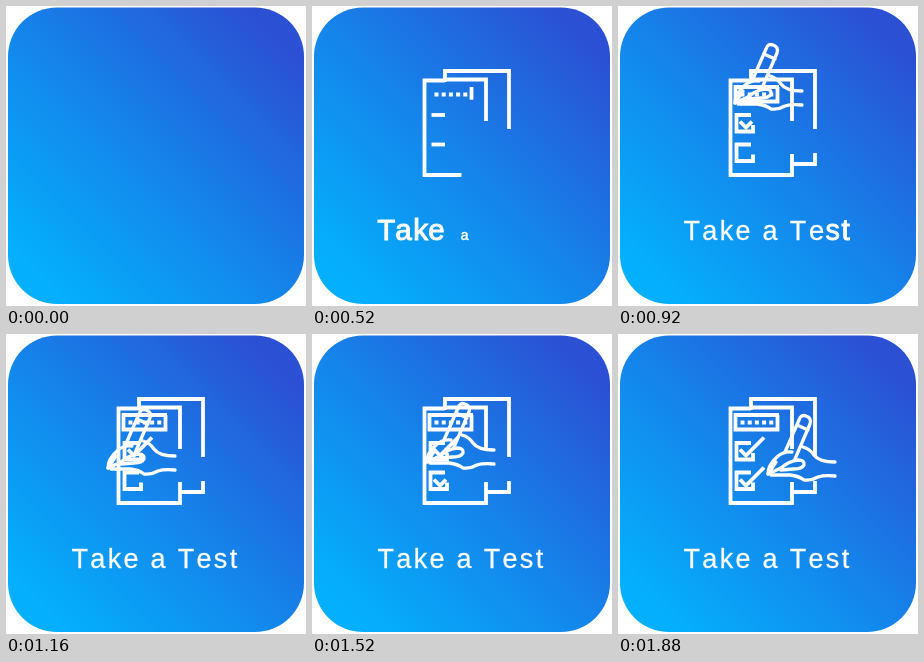
Animation of 300 by 300 pixels, one loop 1960 ms. Source, as an HTML page:

```html
<!DOCTYPE html>
<html lang="en">
<head>
<meta charset="utf-8">
<title>Take a Test</title>
<style>
  html, body { margin: 0; width: 100%; height: 100%; overflow: hidden; background: #fff; }
  #stage { position: absolute; left: 0; top: 0; width: 300px; height: 300px; overflow: hidden; }
  svg { position: absolute; left: 0; top: 0; }
  .ink { fill: none; stroke: #fff; stroke-width: 3.8; stroke-linejoin: miter; }
  #hand { stroke-width: 3.3; stroke-linejoin: round; stroke-linecap: round; }
  #dots { fill: #fff; }
  #label {
    position: absolute; left: 65.5px; top: 210px; white-space: pre; color: #fff;
    font: 27px/30px "Liberation Sans", Arial, sans-serif; letter-spacing: 2.3px;
  }
  #label span { display: inline-block; transform-origin: calc(50% - 1px) 82%; }
</style>
</head>
<body>
<div id="stage">
  <svg width="300" height="300" viewBox="0 0 300 300">
    <defs>
      <linearGradient id="sky" gradientUnits="userSpaceOnUse" x1="30" y1="270" x2="270" y2="30">
        <stop offset="0" stop-color="#04b0fd"/>
        <stop offset=".5" stop-color="#1583ea"/>
        <stop offset="1" stop-color="#2b50d3"/>
      </linearGradient>
    </defs>
    <rect x="2" y="1.5" width="296" height="296.5" rx="49" fill="url(#sky)"/>
    <g class="ink" id="lines"></g>
    <g id="dots"></g>
    <g class="ink" id="hand">
      <!-- pen -->
      <path d="M167 118 L181 86 Q183 80 188 82 Q194 84 192 90 L177 125 M179 91 L190 96"/>
      <path d="M158 128 L150 140 L163 134"/>
      <!-- fingers and wrist -->
      <path d="M150 140 Q150 131 159 123 Q165 117 174 118 M163 134 Q171 127 180 126 Q187 126 186 131 Q184 135 176 135 L163 136"/>
      <path d="M185 113 Q192 115 196 121 Q201 128 217 128 M153 141 L172 141 Q181 142 186 146 Q193 147 200 143 Q206 141 217 142"/>
    </g>
  </svg>
  <div id="label"></div>
</div>
<script>
const LOOP = 1960, STEP = 40;
const NS = "http://www.w3.org/2000/svg";
const byId = id => document.getElementById(id);
const ramp = (t, from, to) => Math.min(1, Math.max(0, (t - from) / (to - from)));
const smooth = p => p * p * (3 - 2 * p);

function add(parent, tag, attrs) {
  const el = document.createElementNS(NS, tag);
  for (const key in attrs) el.setAttribute(key, attrs[key]);
  return byId(parent).appendChild(el);
}

const box = y => `M133 ${y} H118.5 V${y + 16.5} H135 V${y + 10}`;
const tick = y => `M122 ${y} l6 6 L146 ${y - 12}`;

// path, start and end of its drawing in ms
const lines = [
  ["M133 74.5 H112.5 V169 H174 V148", 120, 640],
  ["M132 73.5 H174 V115", 120, 500],
  ["M133 76 V65 H197 V123", 120, 520],
  ["M175 158 H197 V147", 560, 740],
  ["M159.5 81 V95.5 H117.5 V81 H161", 480, 840],
  [box(109), 460, 700],
  [box(138.5), 460, 700],
  [tick(115.5), 800, 1040],
  [tick(145.5), 1400, 1640]
].map(([d, from, to]) => ({ el: add("lines", "path", { d, pathLength: 1 }), from, to }));

const dots = [0, 1, 2, 3, 4].map(i =>
  add("dots", "rect", { x: 122.5 + i * 7.2, y: 86.5, width: 4, height: 4 }));

const letters = [];
for (const ch of "Take a Test") {
  const el = document.createElement("span");
  el.textContent = ch;
  byId("label").append(el);
  if (ch !== " ") letters.push(el);
}

// time, then the hand's distance from its resting place
const route = [
  [560, -50, -38], [760, -48, -35], [820, -45, -33], [920, -33, -43],
  [1000, -26, -49], [1160, -48, -6], [1400, -46, -3], [1520, -35, -12],
  [1600, -26, -18], [1800, 0, 0]
];

function handAt(t) {
  const i = route.findIndex(stop => stop[0] > t);
  if (i === 0) return route[0].slice(1);
  if (i < 0) return [0, 0];
  const a = route[i - 1], b = route[i];
  const p = smooth(ramp(t, a[0], b[0]));
  return [a[1] + (b[1] - a[1]) * p, a[2] + (b[2] - a[2]) * p];
}

function render(t) {
  for (const { el, from, to } of lines) {
    const p = ramp(t, from, to);
    el.style.visibility = p ? "visible" : "hidden";
    el.style.strokeDasharray = p < 1 ? `${p} 2` : "none";
  }

  dots.forEach((el, i) => { el.style.opacity = ramp(t, 340 + i * 25, 400 + i * 25); });

  const [x, y] = handAt(t);
  const hand = byId("hand");
  hand.setAttribute("transform", `translate(${x} ${y})`);
  hand.style.opacity = ramp(t, 580, 720);

  // each letter pops up a little too large and heavy, then settles
  letters.forEach((el, i) => {
    const age = t - 265 - i * 52;
    const extra = 1 - smooth(ramp(age, 230, 380));
    el.style.transform = `scale(${ramp(age, 0, 100) * (1 + 0.1 * extra)})`;
    el.style.webkitTextStroke = `${0.3 + 0.7 * extra}px #fff`;
  });
}

function tick40(now) {
  const t = now % LOOP;
  render(Math.min(Math.floor(t / STEP) * STEP, LOOP - 2 * STEP));
}

const start = performance.now();
function loop() {
  tick40(performance.now() - start);
  requestAnimationFrame(loop);
}
loop();
</script>
</body>
</html>
```
